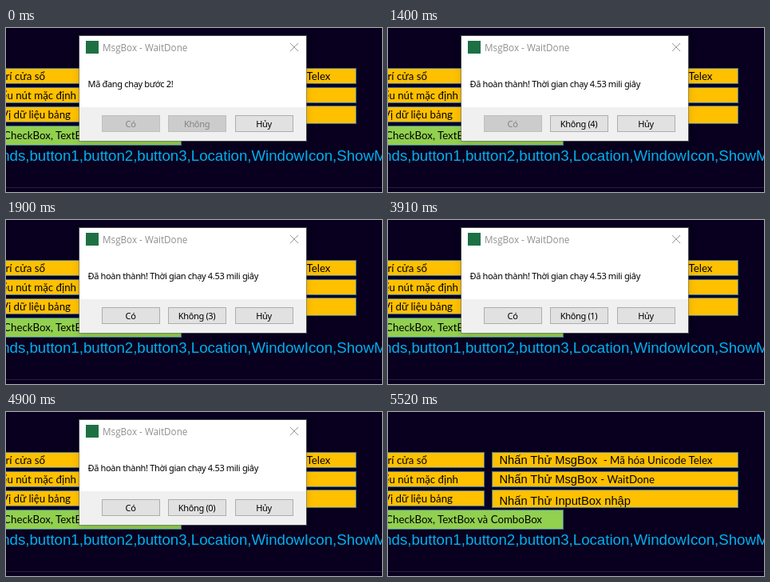
Animation, 471 px wide and 205 px high, one loop 6520 ms. Source, as an HTML page:

```html
<!DOCTYPE html>
<html lang="vi">
<head>
<meta charset="utf-8">
<title>MsgBox - WaitDone</title>
<style>
  html, body { margin: 0; width: 100%; height: 100%; overflow: hidden; background: #08001e; }
  svg { display: block; width: 471px; height: 205px; }
  text { white-space: pre; }
  .strip { fill: #ffc000; stroke: #41719c; }
  .green { fill: #92d050; }
  .label { font: 13.3px Lato, "Open Sans", sans-serif; }
  .end { text-anchor: end; }
  .arial { font: 14.67px "Liberation Sans", Arial, sans-serif; }
  .props { font-size: 18.67px; fill: #00b0f0; }
  .panel { fill: #fff; filter: drop-shadow(0 3px 5px rgba(0, 0, 0, .15)); }
  .title { font: 11.7px "Open Sans", sans-serif; fill: #909090; }
  .ui { font: 11px "Noto Sans", sans-serif; letter-spacing: -.33px; }
  .button rect { fill: #e1e1e1; stroke: #adadad; }
  .button text { text-anchor: middle; }
  .disabled rect { fill: #ccc; stroke: #bfbfbf; }
  .disabled text { fill: #838383; }
</style>
</head>
<body>
<svg viewBox="0 0 471 205">
  <rect width="471" height="205" fill="#08001e"/>
  <path d="M0 199.5H471" stroke="#252037"/>

  <g class="strip">
    <rect x="-9.5" y="50.5" width="130" height="19"/>
    <rect x="-9.5" y="74.5" width="130" height="19"/>
    <rect x="-9.5" y="98.5" width="130" height="19"/>
    <rect x="130.5" y="50.5" width="308" height="19"/>
    <rect x="130.5" y="74.5" width="308" height="19"/>
    <rect x="130.5" y="97.5" width="308" height="22"/>
    <rect class="green" x="-9.5" y="122.5" width="229" height="24"/>
  </g>
  <g class="label end">
    <text x="49" y="65">Vị trí cửa sổ</text>
    <text x="88" y="89">Kiểu nút mặc định</text>
    <text x="81" y="113">Vị dữ liệu bảng</text>
    <text x="193" y="139">CheckBox, TextBox và ComboBox</text>
    <text x="406.5" y="65">- Mã hóa Unicode Telex</text>
    <text x="334" y="89">- WaitDone</text>
  </g>
  <g class="arial">
    <text x="139.5" y="65">Nhấn Thử MsgBox</text>
    <text x="139.5" y="89">Nhấn Thử MsgBox</text>
    <text x="139.5" y="116">Nhấn Thử InputBox nhập</text>
    <text class="props" x="-5.8" y="166">nds,button1,button2,button3,Location,WindowIcon,ShowMsg</text>
  </g>

  <g id="dialog">
    <rect class="panel" x="92" y="10" width="284" height="131"/>
    <rect x="91.5" y="9.5" width="285" height="132" fill="none" stroke="#6e6e6e" stroke-opacity=".6"/>
    <rect x="92" y="99" width="284" height="42" fill="#f0f0f0"/>
    <rect x="100" y="16" width="16" height="16" fill="#1d7044"/>
    <text class="title" x="121" y="29">MsgBox - WaitDone</text>
    <path d="M356 19l10 10M366 19l-10 10" stroke="#999"/>
    <g class="ui">
      <text id="message" x="102.5" y="74"></text>
      <g class="button">
        <rect x="120.5" y="109.5" width="72" height="20"/>
        <text x="156" y="124">Có</text>
      </g>
      <g id="yesOff" class="button disabled">
        <rect x="120.5" y="109.5" width="72" height="20"/>
        <text x="156" y="124">Có</text>
      </g>
      <g id="no" class="button">
        <rect x="203.5" y="109.5" width="72" height="20"/>
        <text id="noLabel" x="239" y="124"></text>
      </g>
      <g class="button">
        <rect x="287.5" y="109.5" width="72" height="20"/>
        <text x="323" y="124">Hủy</text>
      </g>
    </g>
  </g>
</svg>
<script>
  const LOOP = 6520, DONE = 1400, CLOSE = 5420, GONE = 5520;
  const $ = id => document.getElementById(id);
  const messages = [
    [0, "Mã đang chạy bước 2!"],
    [390, "Đang hoạt động!"],
    [DONE, "Đã hoàn thành! Thời gian chạy 4.53 mili giây"]
  ];
  const countdown = [[0, ""], [DONE, " (4)"], [1900, " (3)"], [2910, " (2)"], [3910, " (1)"], [4900, " (0)"]];
  const valueAt = (steps, t) => steps.filter(([start]) => start <= t).pop()[1];

  function draw(t) {
    const closing = t >= CLOSE;
    $("message").textContent = valueAt(messages, t);
    $("noLabel").textContent = "Không" + valueAt(countdown, t);
    $("no").classList.toggle("disabled", t < DONE);

    // The first button is enabled by a short fade in 100 ms steps.
    const step = Math.floor((t - DONE) / 100);
    $("yesOff").style.opacity = Math.min(1, Math.max(0, 1 - step / 4));

    const dialog = $("dialog");
    dialog.style.display = t < GONE ? "" : "none";
    dialog.style.opacity = closing ? .62 : 1;
    dialog.setAttribute("transform", `translate(0 ${closing ? -11 : 0})`);
  }

  let start;
  function frame(now) {
    start ??= now;
    draw((now - start) % LOOP);
    requestAnimationFrame(frame);
  }
  draw(0);
  requestAnimationFrame(frame);
</script>
</body>
</html>
```
